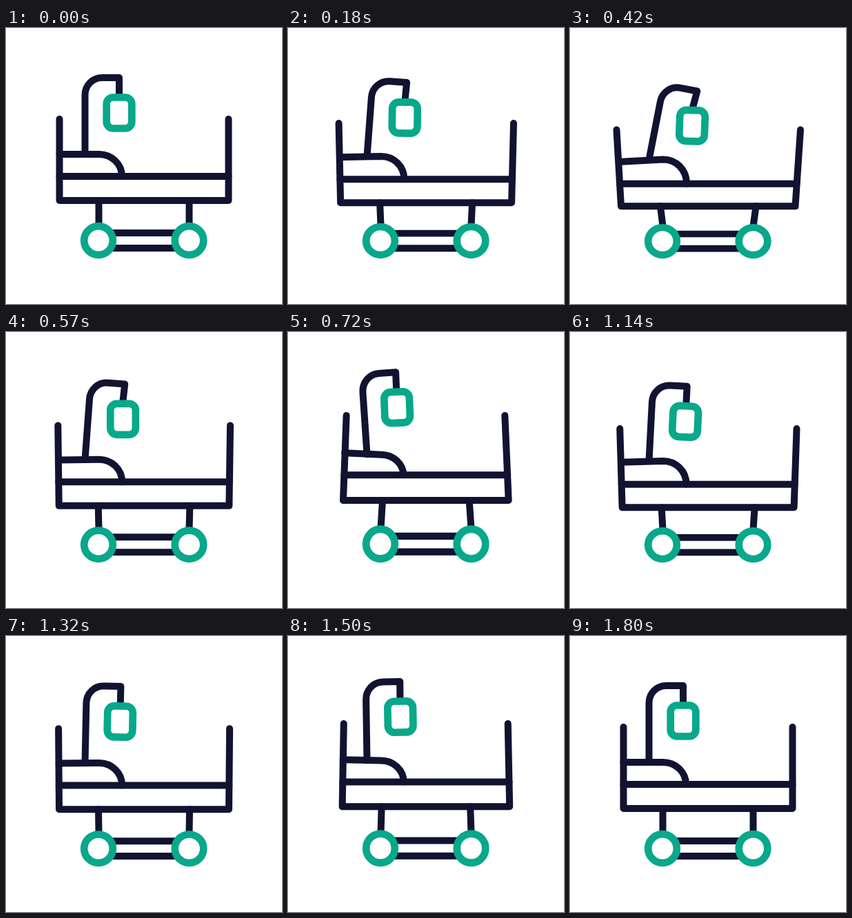
An HTML page with a canvas for the animation above (3830 ms loop, 400 px wide and 400 px high).

```html
<!DOCTYPE html>
<html lang="en">
<head>
<meta charset="utf-8">
<title>Hospital bed</title>
<style>
  html, body { margin: 0; width: 100%; height: 100%; overflow: hidden; background: #fff; }
  canvas { display: block; width: 100vw; height: 100vh; }
</style>
</head>
<body>
<canvas id="stage"></canvas>
<script>
const SIZE = 400, LOOP = 3830, STEP = 30, END = 1800;
const NAVY = '#121331', GREEN = '#08a88a';
const GROUND = 334;
const canvas = document.getElementById('stage');
const ctx = canvas.getContext('2d');

// Each channel is a list of [time, value] poses.
const SQUASH = [[0, 0], [420, 1], [740, -0.73], [1160, 0.53], [1500, -0.33], [END, 0]];
const LEAN   = [[0, 0], [420, 11], [740, -4], [1160, 3], [1500, -0.9], [END, 0]];
const LIFT   = [[0, 0], [420, 0], [740, 5], [1160, 0], [1500, 2.5], [END, 0]];
const HOOK   = [[0, 0], [420, 15], [720, -2.3], [950, -5], [1155, 3], [1500, -0.5], [END, 0]];
const BAG    = [[0, 0], [420, 2], [720, -2.2], [950, -5], [1155, 3], [1500, -1], [END, 0]];

const rad = deg => deg * Math.PI / 180;

function sample(keys, t) {
  const i = keys.findIndex(k => k[0] > t);
  if (i < 0) return keys[keys.length - 1][1];
  const [t0, a] = keys[i - 1], [t1, b] = keys[i];
  const ease = (1 - Math.cos(Math.PI * (t - t0) / (t1 - t0))) / 2;
  return a + (b - a) * ease;
}

function line(...points) {
  ctx.beginPath();
  points.forEach(([x, y]) => ctx.lineTo(x, y));
  ctx.stroke();
}

function pen(color, width) {
  ctx.strokeStyle = color;
  ctx.lineWidth = width;
}

function drawBed(s) {
  const base = 250 + 8.3 * s, rail = 215 + 10.8 * s, top = 132 + 15.5 * s;
  const left = 77.5 - 3.5 * s, right = 322.5 + 4 * s;
  const foot = 286 + 1.5 * s;
  pen(NAVY, 10);
  line([77.5 - 10 * s, top], [left, base], [right, base], [322.5 + 11.5 * s, top]);
  line([left - 2 * s, rail], [right + 2 * s, rail]);
  line([134.5 - 3.5 * s, base], [134.5, foot]);
  line([265.5 + 4 * s, base], [265.5, foot]);

  const y = 183 + 7.5 * s, endX = 168 + s;
  ctx.beginPath();
  ctx.moveTo(77.5 - 6.5 * s, 183 + 11 * s);
  ctx.lineTo(135, y);
  ctx.bezierCurveTo(153, y, endX, y + 14, endX, rail);
  ctx.stroke();
}

function drawWheels(s) {
  ctx.save();
  ctx.translate(0, GROUND);
  ctx.scale(1, 1 - 0.04 * s);
  ctx.translate(0, -GROUND);
  pen(NAVY, 10);
  line([140, 297], [260, 297]);
  line([140, 319], [260, 319]);
  pen(GREEN, 10.7);
  for (const x of [134, 265.5]) {
    ctx.beginPath();
    ctx.arc(x, 308, 20.8, 0, Math.PI * 2);
    ctx.fill();
    ctx.stroke();
  }
  ctx.restore();
}

function drawDrip(t, s) {
  const lean = rad(sample(LEAN, t)), hook = rad(sample(HOOK, t));
  const stretch = 1 + sample(LIFT, t) / 111;
  const baseX = 114.5, baseY = 183 + 8 * s;
  const place = (x, y) => [
    baseX + x * Math.cos(lean) - y * stretch * Math.sin(lean),
    baseY + x * Math.sin(lean) + y * stretch * Math.cos(lean)
  ];
  const tip = place(49.5, -111);
  const end = [tip[0] - 24.5 * Math.sin(hook), tip[1] + 24.5 * Math.cos(hook)];

  pen(NAVY, 10);
  ctx.beginPath();
  ctx.moveTo(...place(0, 0));
  ctx.lineTo(...place(0, -86));
  ctx.bezierCurveTo(...place(0, -100), ...place(11, -111), ...place(25, -111));
  ctx.lineTo(...tip);
  ctx.lineTo(...end);
  ctx.stroke();

  ctx.save();
  ctx.translate(...end);
  ctx.rotate(rad(sample(BAG, t)));
  pen(GREEN, 10.7);
  ctx.beginPath();
  ctx.roundRect(-18.3, 4, 36.6, 45, 9.5);
  ctx.fill();
  ctx.stroke();
  ctx.restore();
}

function draw(t) {
  const dpr = window.devicePixelRatio || 1;
  const w = Math.round(innerWidth * dpr), h = Math.round(innerHeight * dpr);
  if (canvas.width !== w || canvas.height !== h) {
    canvas.width = w;
    canvas.height = h;
  }
  ctx.setTransform(w / SIZE, 0, 0, h / SIZE, 0, 0);
  ctx.fillStyle = '#fff';
  ctx.fillRect(0, 0, SIZE, SIZE);
  ctx.lineCap = ctx.lineJoin = 'round';

  const s = sample(SQUASH, t);
  drawBed(s);
  drawWheels(s);
  drawDrip(t, s);
}

const start = performance.now();
function tick() {
  const t = (performance.now() - start) % LOOP;
  draw(Math.min(END, Math.floor(t / STEP) * STEP));
  requestAnimationFrame(tick);
}
tick();
</script>
</body>
</html>
```
